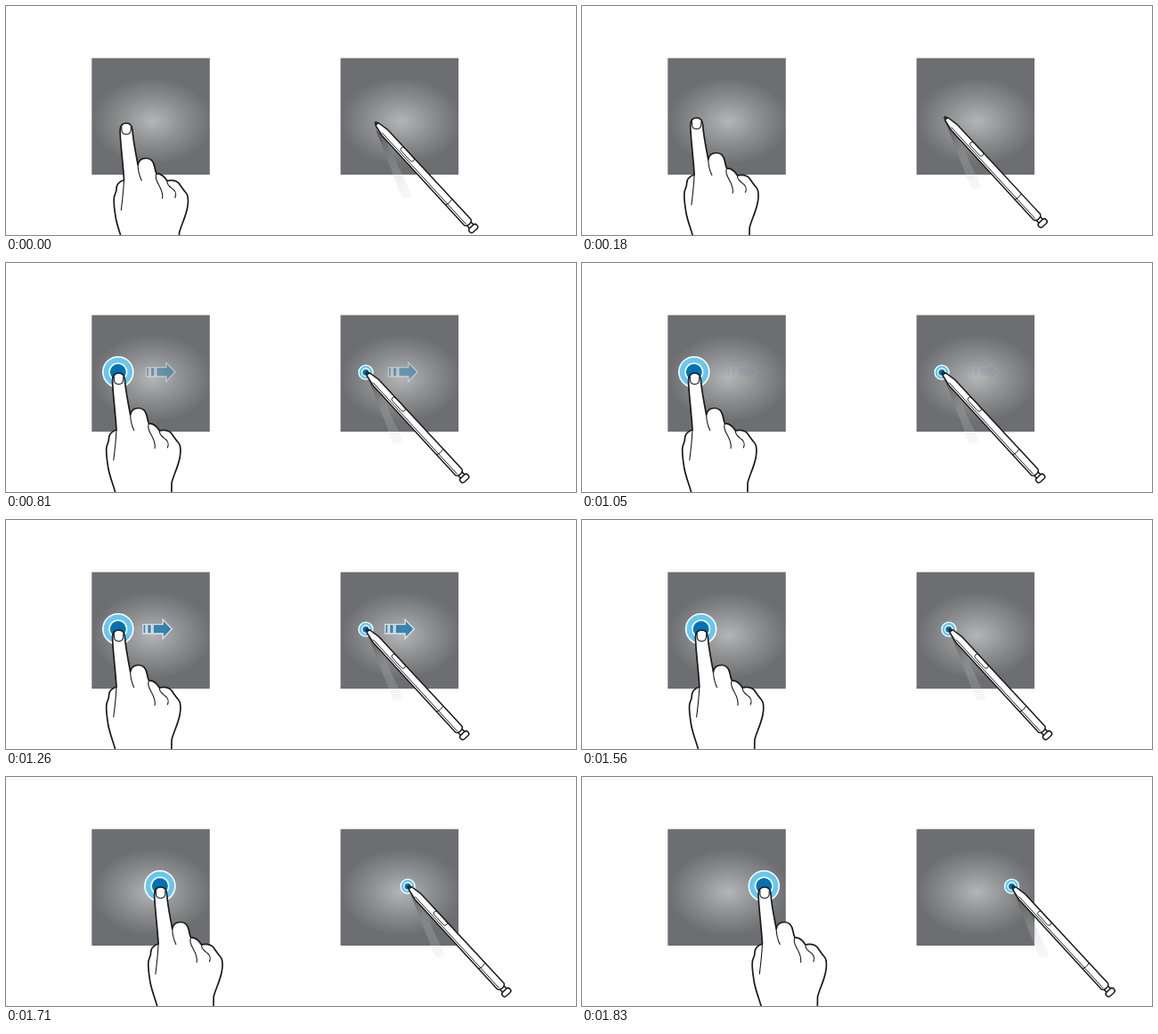
Animation of 640 by 258 pixels, one loop 2.4 s. Source, as an HTML page:

```html
<!DOCTYPE html>
<html lang="en">
<head>
<meta charset="utf-8">
<title>Drag gesture</title>
<style>
  html, body { margin: 0; width: 100%; height: 100%; overflow: hidden; background: #fff; }
  svg { display: block; width: 640px; height: 258px; }
</style>
</head>
<body>
<svg viewBox="0 0 640 258" stroke-linecap="round" stroke-linejoin="round">
  <defs>
    <radialGradient id="glow" gradientUnits="userSpaceOnUse" cx="0" cy="0" r="1" gradientTransform="translate(68 71) scale(68 49)">
      <stop offset="0" stop-color="#b4b5b7"/>
      <stop offset=".5" stop-color="#8e8f91"/>
      <stop offset="1" stop-color="#6d6e71"/>
    </radialGradient>
    <linearGradient id="shade" gradientUnits="userSpaceOnUse" x1="4" y1="8" x2="36" y2="80">
      <stop offset="0" stop-color="#4a4a4a" stop-opacity=".8"/>
      <stop offset=".28" stop-color="#6c6c6c" stop-opacity=".5"/>
      <stop offset=".6" stop-color="#bbb" stop-opacity=".28"/>
      <stop offset="1" stop-color="#ccc" stop-opacity=".15"/>
    </linearGradient>
    <rect id="pad" width="132.5" height="131.3" fill="url(#glow)"/>
    <g id="arrow" fill="#0072b1" stroke="#fff" stroke-width="1.4" stroke-linejoin="miter">
      <path d="M.9 -5.2H4V5.2H.9ZM5.7 -5.2H10.4V5.2H5.7ZM12.2 -5.2H23.2V-10.6L33.4 0L23.2 10.6V5.2H12.2Z"/>
    </g>
  </defs>

  <use href="#pad" x="96.3" y="58.7"/>
  <use href="#pad" x="375.6" y="58.7"/>

  <g id="arrows">
    <use href="#arrow" x="149.3" y="122.8"/>
    <use href="#arrow" x="421.3" y="122.8"/>
  </g>

  <g id="touch">
    <g class="ring" stroke="#fff" stroke-width="1.6">
      <circle cx="125.8" cy="122.8" r="17" fill="#67c7f1"/>
      <circle cx="125.8" cy="122.8" r="9.8" fill="#0072b1"/>
    </g>
    <g fill="none" stroke="#1a1a1a">
      <path fill="#fff" stroke-width="1.7" d="M127 275L122.6 258C120 249 116 239 114.6 230C113.5 222 111.8 213 113 207C113.6 204 115.3 202 115.4 199C115.2 193 118 190 124 188C122.8 168 120.2 150 119.6 134C119.3 127 122 124 126.4 124C131 124 133.2 127 133.5 132C134.2 144 137.3 158 139.6 171C140.5 166 144 163.4 149 163.5C155 163.6 157.3 168 158.3 173C158.8 176 159.4 178.5 160.5 181C165.5 180.5 169.5 184.5 172.4 189C177 187.5 183 188.5 185.5 191.5C188.5 196 190.5 199 193.2 202C196.6 205.5 196.4 212 195.2 219C193 231 187.5 240 186 248L185.6 275"/>
      <path stroke-width="1.1" d="M121.4 128.5V132C121.7 138 131.2 138 131.7 132V128.5M139.6 171C139.8 177 141 183 143.7 188.5M124 188C123.5 199 122.5 208 120.8 222M160.5 181C158.5 184 160.5 189 163 193.5C165.5 198 168.3 203 167 208.8M172.4 189C171.8 194 176 196 179.2 198.5C182.3 201 182.8 205 181.3 208"/>
    </g>
  </g>

  <g id="stylus">
    <path id="shadow" fill="url(#shade)" d="M1 4L12 14L42 79Q38 82 31 81Z"/>
    <g class="ring" stroke="#fff" stroke-width="1.3">
      <circle cx="0" cy=".9" r="8" fill="#67c7f1"/>
      <circle cx="0" cy=".9" r="4.2" fill="#0072b1"/>
    </g>
    <g transform="rotate(47.4)" fill="#fff" stroke="#1a1a1a" stroke-width="1.5">
      <path fill="#444" stroke-width="1" d="M1 -1L5 -2V2L1 1Z"/>
      <path d="M155 -3H162V3H155Z"/>
      <rect x="160.5" y="-5.6" width="6" height="11.2" rx="2.8"/>
      <path d="M4 -2.2L17 -4.6L154 -5Q157 -4 157 0T154 5L17 4.6L4 2.2Q3 0 4 -2.2Z"/>
      <g fill="none" stroke-width=".9">
        <path d="M15 2.4L154 2.7M123 -4.9Q125 0 123 4.9"/>
        <rect x="42" y="-4.6" width="20" height="5" rx="2.5"/>
      </g>
    </g>
  </g>
</svg>
<script>
  const LOOP = 2400, STEP = 30;
  const LAND = 240, ARROW_ON = 510, ARROW_CYCLE = 600, DRAG = 1530, DRAG_END = 1830;
  const byId = id => document.getElementById(id);
  const [arrows, touch, stylus, shadow] = ['arrows', 'touch', 'stylus', 'shadow'].map(byId);
  const rings = document.querySelectorAll('.ring');
  const progress = (t, from, to) => Math.min(1, Math.max(0, (t - from) / (to - from)));
  const move = (el, x, y) => el.setAttribute('transform', `translate(${x} ${y})`);

  function draw(time) {
    const t = Math.floor(time % LOOP / STEP) * STEP;
    const lift = 1 - progress(t, 0, LAND);
    const drag = 78.5 * progress(t, DRAG, DRAG_END);

    move(touch, 8.5 * lift + drag, 8 * lift);
    move(stylus, 404 + 10 * lift + drag, 122.3 + 8 * lift);
    move(shadow, 0, 5 * lift);
    for (const ring of rings) ring.setAttribute('visibility', t >= LAND ? 'visible' : 'hidden');

    // The arrow drifts right while fading, and restarts each cycle.
    const shown = t >= ARROW_ON && t <= DRAG;
    const phase = shown ? (t - ARROW_ON) % ARROW_CYCLE / ARROW_CYCLE : 1;
    move(arrows, 14.5 * phase, 0);
    arrows.setAttribute('opacity', (1 - phase) ** 1.4);
  }

  const start = performance.now();
  function tick() {
    draw(performance.now() - start);
    requestAnimationFrame(tick);
  }
  tick();
</script>
</body>
</html>
```
